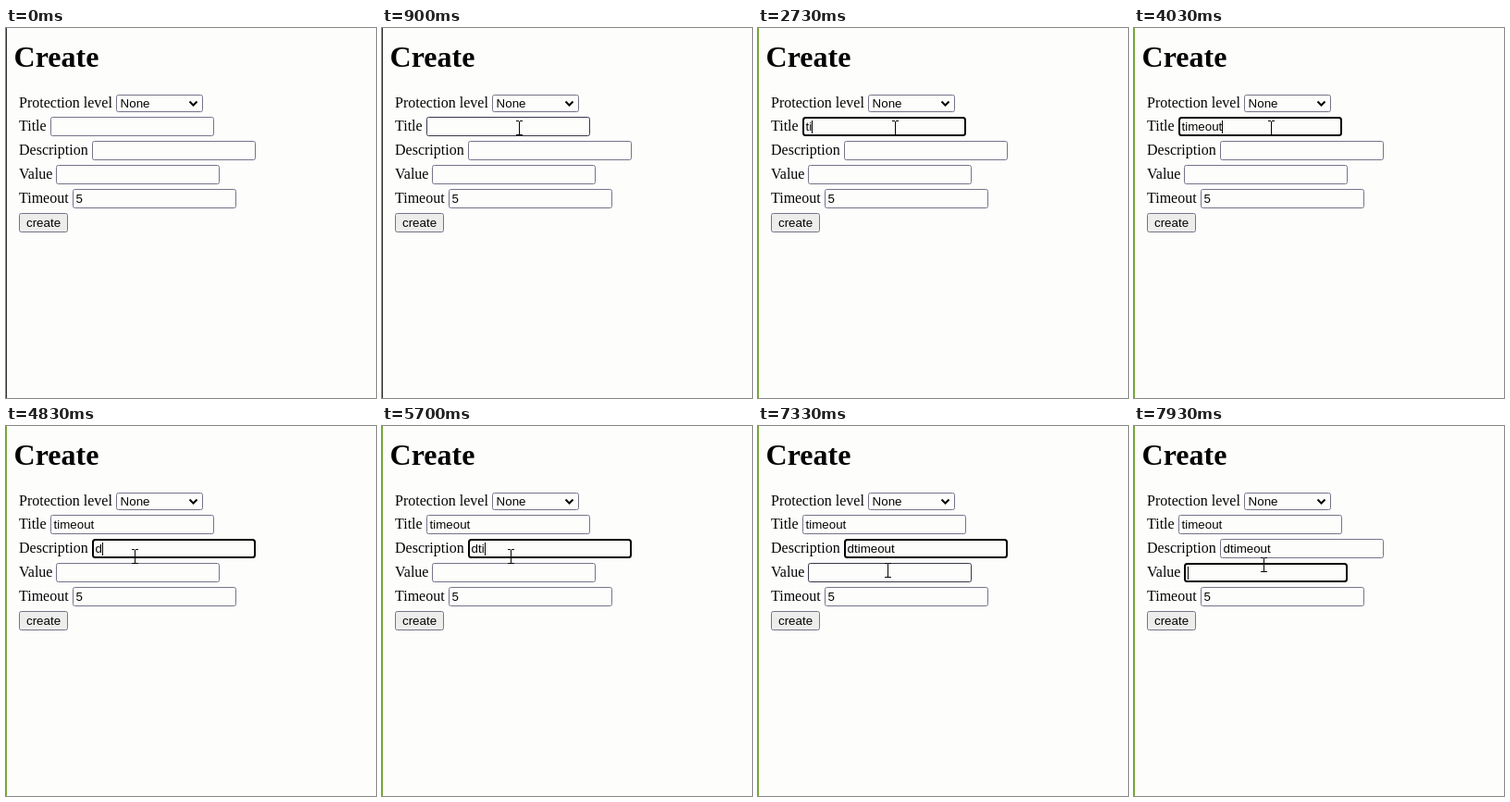
These frames come from a looping animation (400x400 px, 8 s). An HTML page with a canvas:

```html
<!DOCTYPE html>
<html lang="en">
<head>
<meta charset="utf-8">
<title>Create form</title>
<style>
  html, body { margin: 0; width: 100%; height: 100%; overflow: hidden; background: #fdfdfc; }
  canvas { display: block; width: 100vw; height: 100vh; }
</style>
</head>
<body>
<canvas id="stage" width="400" height="400"></canvas>
<script>
const ctx = document.getElementById('stage').getContext('2d');
const LOOP = 8000;
const PAPER = '#fdfdfc', INK = '#040404', BORDER = '#74748a';
const SERIF = '"Liberation Serif", "Times New Roman", serif';
const UI_FONT = '13.333px "Liberation Sans", Arial, sans-serif';

// keys: time in ms at which each character appears
const fields = [
  { label: 'Title', x: 48, y: 96, text: 'timeout', focus: 1200, blur: 4450,
    keys: [1900, 2320, 2850, 3000, 3150, 3280, 3560] },
  { label: 'Description', x: 93, y: 122, text: 'dtimeout', focus: 4450, blur: 7450,
    keys: [4760, 5300, 5620, 5980, 6130, 6280, 6450, 6600] },
  { label: 'Value', x: 54, y: 148, text: '', focus: 7450, blur: LOOP, keys: [] },
  { label: 'Timeout', x: 72, y: 174, text: '5', focus: LOOP, blur: LOOP, keys: [0] }
];
const FIELD_W = 177, FIELD_H = 21;

// pointer stops: time, x, y
const path = [
  [30, 396, 300], [830, 148, 108], [4240, 148, 108], [4430, 139, 141],
  [7150, 139, 141], [7420, 141, 161], [7640, 141, 161], [7860, 140, 150]
];

function pointerAt(t) {
  const next = path.findIndex(stop => stop[0] > t);
  if (next < 0) return path[path.length - 1].slice(1);
  const [t0, x0, y0] = path[next - 1], [t1, x1, y1] = path[next];
  const p = (t - t0) / (t1 - t0), ease = p * p * (3 - 2 * p);
  return [Math.round(x0 + (x1 - x0) * ease), Math.round(y0 + (y1 - y0) * ease)];
}

function write(text, x, y, font) {
  ctx.font = font;
  ctx.fillStyle = INK;
  ctx.fillText(text, x, y);
}

function box(x, y, w, h, { fill = PAPER, stroke = BORDER, line = 1, radius = 2 } = {}) {
  ctx.beginPath();
  ctx.roundRect(x + line / 2, y + line / 2, w - line, h - line, radius);
  ctx.fillStyle = fill;
  ctx.fill();
  ctx.strokeStyle = stroke;
  ctx.lineWidth = line;
  ctx.stroke();
}

function polyline(points, width) {
  ctx.beginPath();
  points.forEach(([x, y]) => ctx.lineTo(x, y));
  ctx.strokeStyle = INK;
  ctx.lineWidth = width;
  ctx.stroke();
}

function contains(field, [x, y]) {
  return x >= field.x && x < field.x + FIELD_W && y >= field.y && y < field.y + FIELD_H;
}

function drawField(field, t, pointer) {
  const { x, y } = field;
  const focused = t >= field.focus && t < field.blur;
  const hovered = pointer && contains(field, pointer);
  write(field.label, 14, y + 15, '16px ' + SERIF);
  box(x, y, FIELD_W, FIELD_H, focused
    ? { stroke: INK, line: 2, radius: 2.5 }
    : { stroke: hovered ? '#38384a' : BORDER });

  const typed = field.keys.filter(time => time <= t);
  const text = field.text.slice(0, typed.length);
  write(text, x + 3.6, y + 15, UI_FONT);

  const lastInput = Math.max(field.focus, ...typed);
  if (focused && (t - lastInput) % 1000 < 500) {
    ctx.fillRect(Math.round(x + 3.6 + ctx.measureText(text).width), y + 4, 1, 14);
  }
}

function drawPointer([x, y]) {
  ctx.fillStyle = INK;
  if (fields.some(field => contains(field, [x, y]))) {
    ctx.fillRect(x, y - 7, 1, 15);
    for (const end of [y - 8, y + 7]) {
      ctx.fillRect(x - 3, end, 3, 1);
      ctx.fillRect(x + 1, end, 3, 1);
    }
    return;
  }
  ctx.save();
  ctx.translate(x + 0.5, y + 0.5);
  const arrow = new Path2D('M0 0V16L4 12.5L6.5 18L9 17L6.5 11.5H11.5Z');
  ctx.fillStyle = '#fff';
  ctx.fill(arrow);
  ctx.strokeStyle = INK;
  ctx.lineWidth = 1;
  ctx.stroke(arrow);
  ctx.restore();
}

function draw(t) {
  const pointer = t >= path[0][0] ? pointerAt(t) : null;
  ctx.fillStyle = PAPER;
  ctx.fillRect(0, 0, 400, 400);
  // window edge takes the accent colour once the window is active
  ctx.fillStyle = t < fields[0].focus ? '#30302c' : '#76a83c';
  ctx.fillRect(0, 0, 1, 400);

  write('Create', 8.6, 42, 'bold 32px ' + SERIF);
  write('Protection level', 14, 86, '16px ' + SERIF);
  box(119, 72, 94, 19);
  write('None', 123.6, 86, UI_FONT);
  polyline([[198.5, 79.5], [202.5, 83.5], [206.5, 79.5]], 2);

  fields.forEach(field => drawField(field, t, pointer));
  box(14, 200, 53, 21, { fill: '#ededec' });
  write('create', 22, 215, UI_FONT);
  if (pointer) drawPointer(pointer);
}

const start = performance.now();
function tick() {
  draw((performance.now() - start) % LOOP);
  requestAnimationFrame(tick);
}
tick();
</script>
</body>
</html>
```
